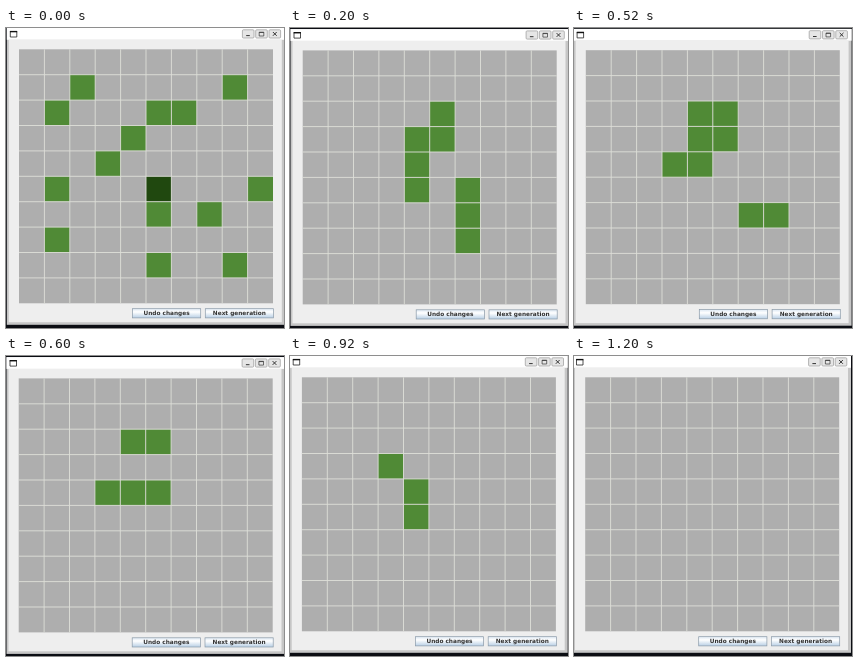
Animation of 278x300 px, one loop 1400 ms. Source, as an HTML page:

```html
<!DOCTYPE html>
<html lang="en">
<head>
<meta charset="utf-8">
<style>
  html, body { margin: 0; width: 100%; height: 100%; overflow: hidden; background: #0b0d13; }
  svg { display: block; width: 100%; height: 100%; }
  text { font: bold 5.8px "DejaVu Sans", sans-serif; fill: #333; text-anchor: middle; }
</style>
</head>
<body>
<svg viewBox="0 0 278 300">
  <defs>
    <linearGradient id="steel" x2="0" y2="1">
      <stop offset="0" stop-color="#dde8f3"/>
      <stop offset=".35" stop-color="#fff"/>
      <stop offset="1" stop-color="#b8cfe5"/>
    </linearGradient>
  </defs>
  <g id="win">
    <rect x="-1" width="278" height="296.8" fill="#c6c6c6"/>
    <rect x="-1" width="278" height="11.8" fill="#fff"/>
    <rect x="1" y="11.8" width="273" height="282.4" fill="#eee"/>

    <path d="M2.5 3.5h6.5v5.5h-6.5z" fill="#fff" stroke="#222" stroke-width=".8"/>
    <path d="M2.1 3.6h7.3" stroke="#111" stroke-width="1.4"/>

    <g fill="#e6e6e6" stroke="#a4a4a4" stroke-width=".8">
      <rect x="234.6" y="1.8" width="11.6" height="8.2" rx="1"/>
      <rect x="247.9" y="1.8" width="11.6" height="8.2" rx="1"/>
      <rect x="261.2" y="1.8" width="11.6" height="8.2" rx="1"/>
    </g>
    <g fill="none" stroke="#333">
      <path d="M238.4 7.6h3.6"/>
      <path d="M251.4 4.2h4.6v3.8h-4.6zM251.4 4.5h4.6" stroke-width=".7"/>
      <path d="M265.1 4l3.8 3.8m0-3.8l-3.8 3.8"/>
    </g>

    <g id="grid" transform="translate(11.2 21.3)">
      <rect width="254" height="254" fill="#aeaeae"/>
      <g id="cells"></g>
      <path id="lines" stroke="#dedfd8" stroke-width=".9"/>
    </g>

    <g fill="url(#steel)" stroke="#8b9aa8" stroke-width=".7">
      <rect x="124.7" y="280.7" width="68.2" height="9.2"/>
      <rect x="197.5" y="280.7" width="68.2" height="9.2"/>
    </g>
    <text x="158.8" y="287.3">Undo changes</text>
    <text x="231.6" y="287.3">Next generation</text>
  </g>
</svg>
<script>
const SIZE = 10, CELL = 25.4, STEP = 200;
const seed = ["12", "18", "21", "25", "26", "34", "43", "51", "55", "59", "65", "67", "71", "85", "88"];
// the window shifts slightly with every generation
const shifts = [[1.8, 0], [1.5, 1.1], [.6, .9], [1.5, 1.1], [.7, 0], [.6, .9], [0, 0]];
const $ = id => document.getElementById(id);

const board = Array.from({ length: SIZE * SIZE }, (_, i) => seed.includes(String(i).padStart(2, "0")));

function next(cells) {
  return cells.map((alive, i) => {
    const col = i % SIZE, row = (i - col) / SIZE;
    let n = 0;
    for (let r = row - 1; r <= row + 1; r++)
      for (let c = col - 1; c <= col + 1; c++)
        if (r >= 0 && r < SIZE && c >= 0 && c < SIZE && cells[r * SIZE + c]) n++;
    // n includes the cell itself
    return n === 3 || (alive && n === 4);
  });
}

const generations = [board];
while (generations.length < shifts.length) generations.push(next(generations.at(-1)));

let lines = "";
for (let i = 1; i < SIZE; i++) {
  const p = i * CELL;
  lines += `M${p} 0V254M0 ${p}H254`;
}
$("lines").setAttribute("d", lines);

function draw(gen) {
  const [dx, dy] = shifts[gen];
  $("win").setAttribute("transform", `translate(${dx} ${dy})`);
  $("cells").innerHTML = generations[gen].map((alive, i) => {
    if (!alive) return "";
    const col = i % SIZE, row = (i - col) / SIZE;
    const fill = gen === 0 && i === 55 ? "#20480f" : "#508a36";
    return `<rect x="${col * CELL}" y="${row * CELL}" width="${CELL}" height="${CELL}" fill="${fill}"/>`;
  }).join("");
}

let shown = -1;
function tick() {
  const gen = Math.floor(performance.now() / STEP) % generations.length;
  if (gen !== shown) draw(shown = gen);
  requestAnimationFrame(tick);
}
tick();
</script>
</body>
</html>
```
